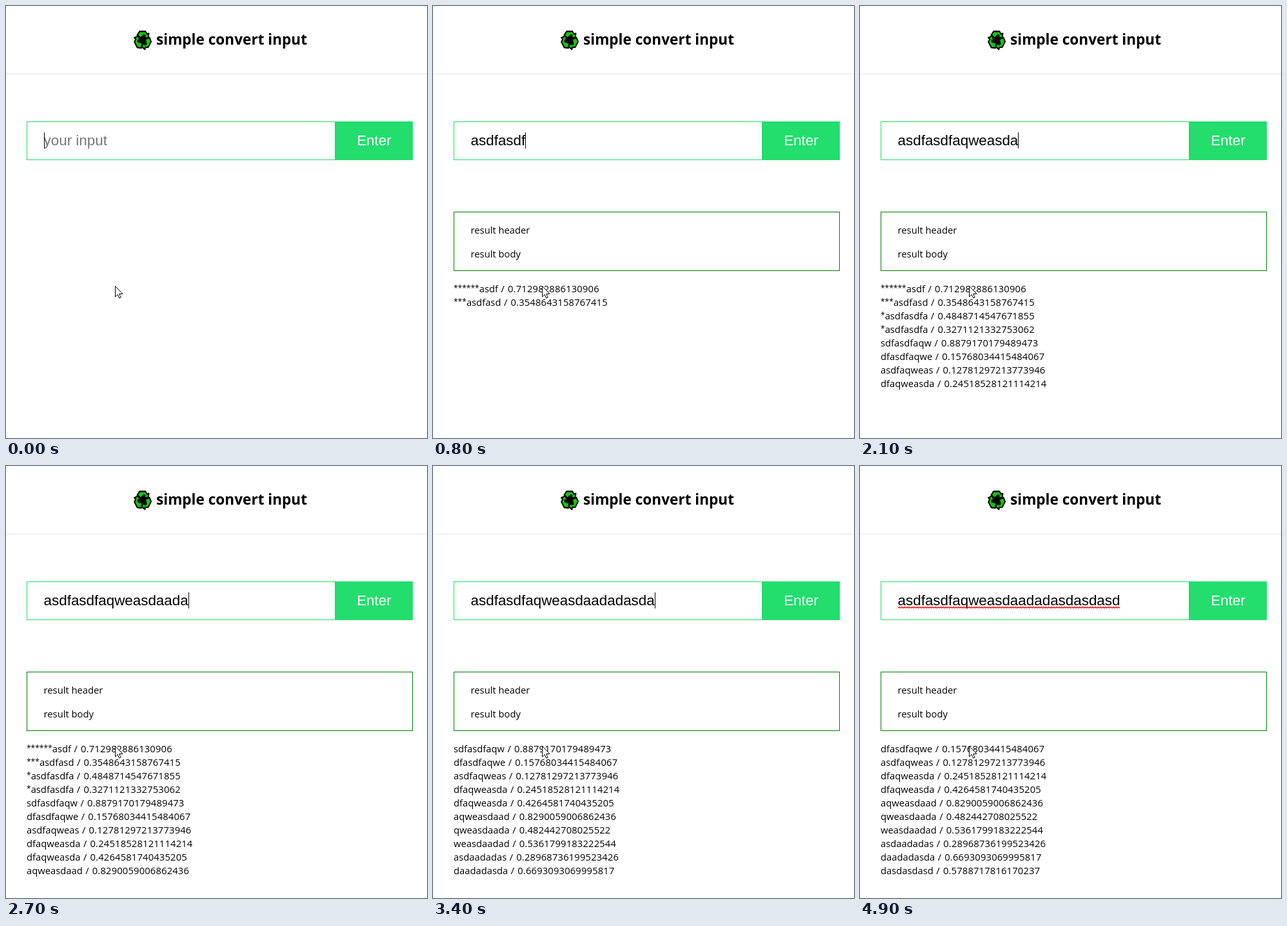
These frames come from a looping animation (653 by 670 pixels, 5.3 s). An HTML page:

```html
<!DOCTYPE html>
<html lang="en">
<head>
<meta charset="utf-8">
<title>simple convert input</title>
<style>
  html, body { margin: 0; width: 100%; height: 100%; overflow: hidden; background: #fff; }
  svg { display: block; width: 653px; height: 670px; }
  text { white-space: pre; }
  .ui { font: 14.75px "Open Sans", "Noto Sans", sans-serif; }
  .title { font: bold 22.6px "Open Sans", "Noto Sans", sans-serif; }
  .field { font: 22.4px "Liberation Sans", Arial, sans-serif; }
  .stars { font-size: 12px; }
  .slash { letter-spacing: .64px; }
  .num { letter-spacing: .17px; }
</style>
</head>
<body>
<svg viewBox="0 0 653 670">
  <defs>
    <path id="arrow" d="M-9-7.5L-5-13H4.5L7-9 10-10 9-3 2-4 4-6.5 2-8-3-3Z"/>
  </defs>
  <g transform="translate(212 53) scale(.95 1.05)" fill="#16c60c" stroke="#000" stroke-width="2" stroke-linejoin="round">
    <circle r="8" fill="#000"/>
    <use href="#arrow"/>
    <use href="#arrow" transform="rotate(120)"/>
    <use href="#arrow" transform="rotate(240)"/>
  </g>
  <text class="title" x="233" y="60">simple convert input</text>
  <rect y="105" width="653" height="1" fill="#e6e6e6"/>

  <rect x="32.5" y="179.5" width="478" height="59" fill="none" stroke="#23dd6d"/>
  <rect x="510" y="179" width="121" height="60" fill="#23dd6d"/>
  <text class="field" x="570.9" y="216" fill="#fff" text-anchor="middle">Enter</text>
  <text class="field" id="value" x="58.6" y="216"></text>
  <path id="squiggle" fill="none" stroke="#f00" stroke-width="1.4"/>
  <rect id="caret" y="196" width="1" height="25"/>

  <g id="result" class="ui">
    <rect x="32.5" y="319.5" width="598" height="91" fill="none" stroke="#008000"/>
    <text x="58.6" y="353">result header</text>
    <text x="58.6" y="390">result body</text>
    <g id="rows"></g>
  </g>

  <path transform="translate(169.5 434.5)" d="M0 0V16.5L3.7 13 6.2 18.5 8.6 17.5 6.2 12H11.5Z" fill="#fff" stroke="#000"/>
</svg>
<script>
  const LOOP = 5300, TICK = 100;
  const FIRST_ROW = 480, ROW_EVERY = 224, LAST_ROW = 4500, MAX_ROWS = 10;
  const CARET_OFF = 4400, SPELLCHECK = 4900;
  const LEFT = 58.6;

  const TYPED = 'asdfasdfaqweasdaadadasdasdasd';
  const LINES = `******asdf / 0.712982886130906
***asdfasd / 0.3548643158767415
*asdfasdfa / 0.4848714547671855
*asdfasdfa / 0.3271121332753062
sdfasdfaqw / 0.8879170179489473
dfasdfaqwe / 0.15768034415484067
asdfaqweas / 0.12781297213773946
dfaqweasda / 0.24518528121114214
dfaqweasda / 0.4264581740435205
aqweasdaad / 0.8290059006862436
qweasdaada / 0.482442708025522
weasdaadad / 0.5361799183222544
asdaadadas / 0.28968736199523426
daadadasda / 0.6693093069995817
dasdasdasd / 0.5788717816170237`.split('\n');

  // Typing bursts, with short pauses between them
  const BURSTS = [
    { from: 100, to: 900, keys: 9 },
    { from: 1200, to: 2100, keys: 7 },
    { from: 2300, to: 2900, keys: 4 },
    { from: 3000, to: 3900, keys: 9 }
  ];

  const el = id => document.getElementById(id);
  const value = el('value'), caret = el('caret'), squiggle = el('squiggle');
  const result = el('result'), rows = el('rows');
  const clamp = (x, lo, hi) => Math.min(hi, Math.max(lo, x));
  const show = (node, on) => node.setAttribute('visibility', on ? 'visible' : 'hidden');

  let wave = 'M59 220.2';
  for (let x = 61, up = true; x <= 403; x += 2, up = !up) wave += `L${x} ${up ? 218.6 : 220.2}`;
  squiggle.setAttribute('d', wave);

  function typedLength(t) {
    const keys = BURSTS.map(b => b.keys * clamp((t - b.from) / (b.to - b.from), 0, 1));
    return Math.round(keys.reduce((sum, k) => sum + k));
  }

  // Rows arrive steadily while typing; the last one waits for the pause
  function rowCount(t) {
    if (t >= LAST_ROW) return LINES.length;
    return clamp(Math.floor((t - FIRST_ROW) / ROW_EVERY) + 1, 0, LINES.length - 1);
  }

  function rowMarkup(line, i) {
    const [, stars, word, number] = line.match(/^(\**)(\w+) \/ (.+)$/);
    const lead = stars && `<tspan class="stars" dy="-2">${stars}</tspan>`;
    return `<text x="32" y="${444 + 21 * i}">${lead}<tspan dy="${stars ? 2 : 0}">${word}</tspan>` +
      `<tspan class="slash"> / </tspan><tspan class="num">${number}</tspan></text>`;
  }

  function draw(t) {
    const length = typedLength(t), count = rowCount(t);
    value.textContent = length ? TYPED.slice(0, length) : 'your input';
    value.setAttribute('fill', length ? '#000' : '#757575');
    caret.setAttribute('x', Math.round(LEFT + (length && value.getComputedTextLength())));
    rows.innerHTML = LINES.slice(0, count).slice(-MAX_ROWS).map(rowMarkup).join('');
    show(result, count > 0);
    show(caret, t < CARET_OFF);
    show(squiggle, t >= SPELLCHECK);
  }

  const start = performance.now();
  let drawn;
  function tick() {
    const t = Math.floor((performance.now() - start) % LOOP / TICK) * TICK;
    if (t !== drawn) draw(drawn = t);
    requestAnimationFrame(tick);
  }
  tick();
</script>
</body>
</html>
```
